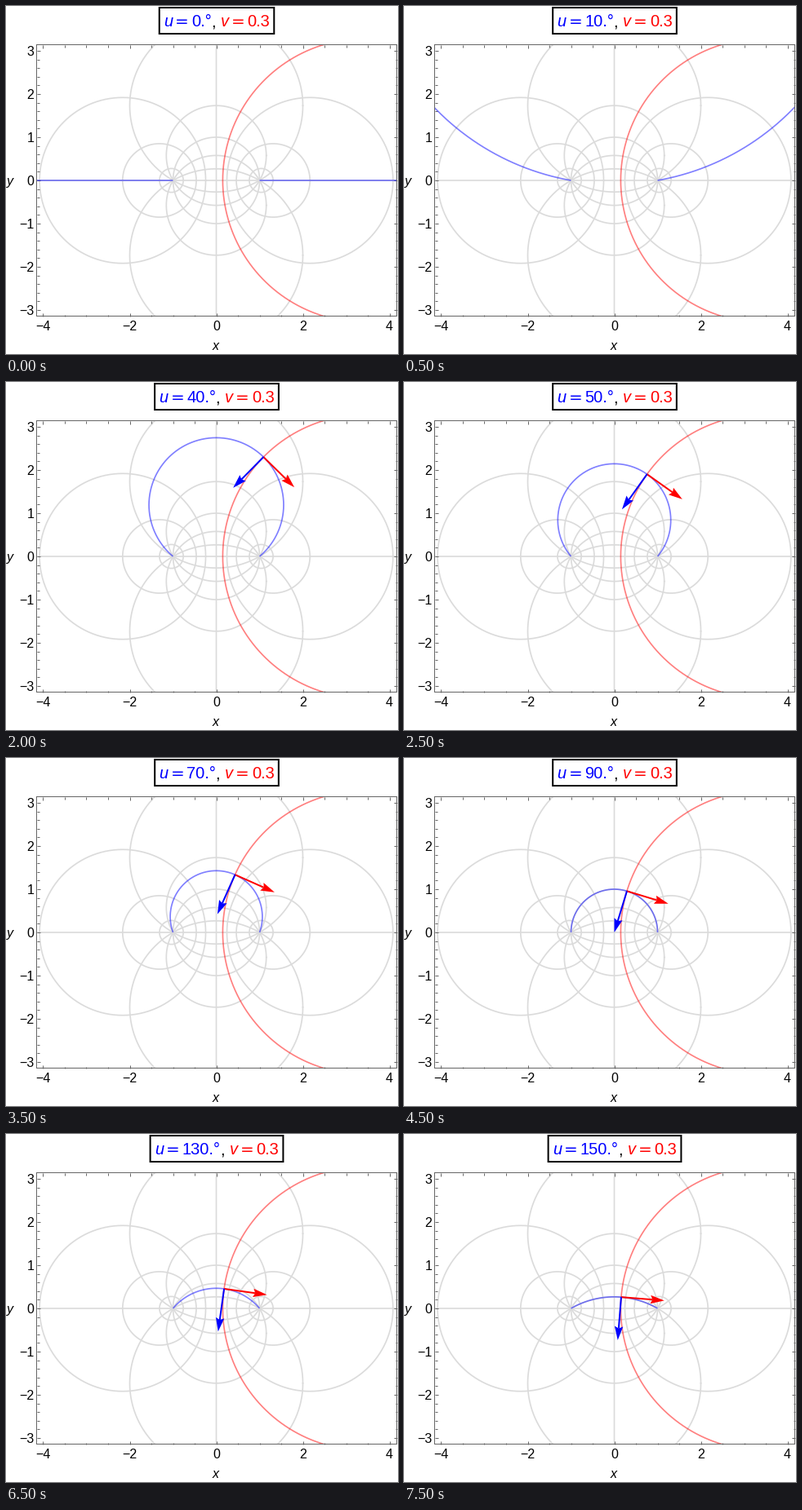
Recreate the animation shown at these times as a matplotlib script. Size 480 by 427 pixels, loop 8 s.

```python
import numpy as np
import matplotlib
import matplotlib.pyplot as plt
from matplotlib.animation import FuncAnimation
from matplotlib.patches import Polygon, Rectangle
from matplotlib.ticker import MultipleLocator

matplotlib.rcParams["font.family"] = "Liberation Sans"
matplotlib.rcParams["path.snap"] = False

W, H, DPI = 480, 427, 64
PT = 72 / DPI                # points per pixel
UNIT = 53                    # pixels per plot unit
CX, CY = 257.5, 214          # pixel position of the plot origin
LEFT, RIGHT, TOP, BOTTOM = 37.5, 478.5, 47.5, 380.5
GRAY, FRAME = "#dbdbdb", "#666666"
BLUE, RED = "#0000ff", "#ff0000"
V0 = 0.3
FRAMES = 16


def bipolar(u, v):
    """Bipolar coordinates with foci at (-1, 0) and (1, 0)."""
    with np.errstate(divide="ignore", invalid="ignore"):
        d = np.cosh(v) - np.cos(u)
        return np.sinh(v) / d, np.sin(u) / d


fig = plt.figure(figsize=(W / DPI, H / DPI), dpi=DPI, facecolor="white")
ax = fig.add_axes([LEFT / W, 1 - BOTTOM / H,
                   (RIGHT - LEFT) / W, (BOTTOM - TOP) / H])
ax.set_xlim((LEFT - CX) / UNIT, (RIGHT - CX) / UNIT)
ax.set_ylim((CY - BOTTOM) / UNIT, (CY - TOP) / UNIT)

# Frame and ticks
for axis, major, minor in ((ax.xaxis, 2, 0.5), (ax.yaxis, 1, 0.2)):
    axis.set_major_locator(MultipleLocator(major))
    axis.set_minor_locator(MultipleLocator(minor))
    axis.set_major_formatter(lambda t, _: f"{t:.0f}".replace("-", "\u2212"))
ax.tick_params(which="both", direction="in", top=True, right=True,
               color=FRAME, width=PT)
ax.tick_params(which="major", length=4.2 * PT, labelsize=16 * PT)
ax.tick_params(which="minor", length=2.5 * PT)
ax.tick_params(axis="x", pad=5 * PT)
ax.tick_params(axis="y", pad=3 * PT)
for spine in ax.spines.values():
    spine.set(color=FRAME, linewidth=PT)

# Pixel layer for the title and the axis names
page = fig.add_axes([0, 0, 1, 1])
page.set(xlim=(0, W), ylim=(H, 0))
page.axis("off")
for x, y, name in ((256.7, 422, "x"), (4.5, 220, "y")):
    page.text(x, y, name, size=16 * PT, style="italic", ha="center")

# Coordinate grid
grid = dict(color=GRAY, lw=1.7 * PT, zorder=1)
turn = np.linspace(0, 2 * np.pi, 361)


def circle(cx, cy, r):
    ax.plot(cx + r * np.cos(turn), cy + r * np.sin(turn), **grid)


ax.axhline(0, **grid)
ax.axvline(0, **grid)
for v in (0.5, 1, 2):
    for side in (-1, 1):
        circle(side / np.tanh(v), 0, 1 / np.sinh(v))
for deg in range(30, 180, 30):
    u = np.radians(deg)
    circle(0, 1 / np.tan(u), 1 / np.sin(u))

# Highlighted coordinate curves
v_range = np.arange(-800, 801) / 100
centre, radius = np.array([1 / np.tanh(V0), 0]), 1 / np.sinh(V0)
ax.plot(centre[0] + radius * np.cos(turn), radius * np.sin(turn),
        color=RED, alpha=0.5, lw=1.7 * PT, zorder=2)
u_curve, = ax.plot([], [], color=BLUE, alpha=0.5, lw=1.7 * PT, zorder=2,
                   solid_capstyle="butt")


class Arrow:
    """Unit-length arrow with a notched head."""
    HEAD = np.array([[0, 0], [-17, 5.2], [-14.5, 0], [-17, -5.2]]) / UNIT

    def __init__(self, color, z):
        self.shaft, = ax.plot([], [], color=color, lw=2 * PT, zorder=z,
                              solid_capstyle="butt")
        self.head = ax.add_patch(Polygon(self.HEAD, fc=color, lw=0, zorder=z))

    def place(self, p, d):
        normal = np.array([-d[1], d[0]])
        head = p + d + self.HEAD @ np.array([d, normal])
        self.shaft.set_data(*zip(p, head[2]))
        self.head.set_xy(head)


red_arrow, blue_arrow = Arrow(RED, 3), Arrow(BLUE, 4)

# Title made of coloured pieces laid side by side
TITLE_X, PAD, EQUALS_GAP = 258, 5.2, 3
box = page.add_patch(Rectangle((0, 2), 1, 32, fill=False, ec="black",
                               lw=2 * PT, joinstyle="miter"))


def piece(s, color, **style):
    return page.text(0, 25, s, color=color, size=20 * PT, **style)


def equals(color):
    return piece("=", color, family="DejaVu Sans")


u_value = piece("", BLUE)
pieces = [piece("u", BLUE, style="italic"), equals(BLUE), u_value,
          piece(", ", "black"),
          piece("v", RED, style="italic"), equals(RED), piece(f"{V0}", RED)]


def set_title(deg):
    u_value.set_text(f"{deg}.\u00b0")
    renderer = fig.canvas.get_renderer()
    gaps = [EQUALS_GAP if t.get_text() == "=" else 0 for t in pieces]
    widths = [renderer.get_text_width_height_descent(
        t.get_text(), t.get_fontproperties(), False)[0] for t in pieces]
    total = sum(widths) + 2 * sum(gaps)
    x = TITLE_X - total / 2
    box.set(x=x - PAD, width=total + 2 * PAD)
    for t, w, gap in zip(pieces, widths, gaps):
        t.set_x(x + gap)
        x += w + 2 * gap


def update(i):
    deg = 10 * i
    u = np.radians(deg)
    u_curve.set_data(*bipolar(u, v_range))
    p = np.array(bipolar(u, V0))
    inward = (centre - p) / radius
    red_arrow.place(p, inward)
    blue_arrow.place(p, np.array([inward[1], -inward[0]]))
    set_title(deg)
    return []


anim = FuncAnimation(fig, update, frames=FRAMES, interval=500, repeat=True,
                     repeat_delay=0)
plt.show()
```
